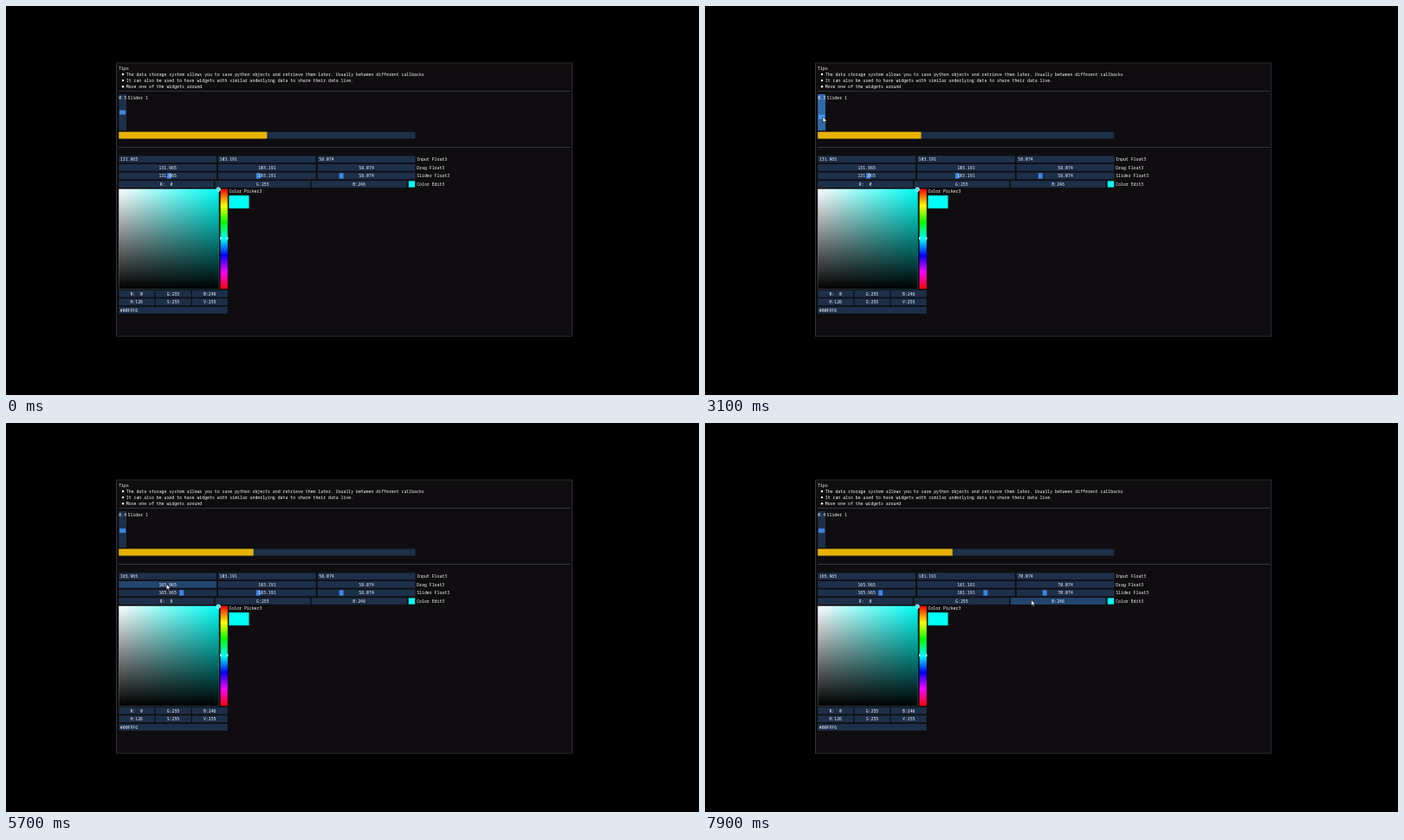
An HTML page with a canvas for the animation above (8 s loop, 800 px wide and 450 px high).

```html
<!DOCTYPE html>
<html lang="en">
<head>
<meta charset="utf-8">
<title>Shared widget values</title>
<style>
  html, body { margin: 0; width: 100%; height: 100%; overflow: hidden; background: #000; }
  canvas { display: block; }
</style>
</head>
<body>
<canvas width="800" height="450"></canvas>
<script>
const ctx = document.querySelector('canvas').getContext('2d');
const LOOP = 8000, STEP = 100;
const UI_SCALE = 0.4164;          // stage pixels per interface pixel
const ROW_H = 7.9;
const COLORS = {
  panel: '#0f0d0f', line: '#35353c', text: '#fff', frame: '#1d2f49', hover: '#23456d',
  active: '#3169ac', grab: '#3d85e0', grabActive: '#4296fa', bar: '#e8b200', pick: '#00fff6'
};

// Pointer path: time, x, y
const PATH = [
  [2300, 136, 124.2], [3100, 136, 128.3], [3600, 136, 124.6], [3700, 136, 124.6],
  [4050, 171, 177.3], [4350, 171, 177.3], [4550, 171, 186.3], [4600, 171, 186.3],
  [5000, 195.57, 186.3], [5200, 200.57, 186.3], [5650, 185.16, 186.3], [5700, 185.16, 186.3],
  [5950, 273, 186.3], [6250, 297.98, 186.3], [6400, 305.48, 186.3], [6550, 305.48, 186.3],
  [6950, 372, 186.3], [7250, 377, 186.3], [7400, 377, 186.3], [7700, 376.7, 204.6]
];
const SLIDE = [2300, 3600];
const DRAGS = [
  { base: 131.965, from: 4600, to: 5650 },
  { base: 103.191, from: 5950, to: 6500 },
  { base: 58.074, from: 6950, to: 7300 }
];
const SELECT = [4100, 4600];

const clamp = (v, lo, hi) => Math.min(hi, Math.max(lo, v));
const within = (t, [from, to]) => t >= from && t < to;

function pointer(t) {
  t = clamp(t, PATH[0][0], PATH.at(-1)[0]);
  const i = Math.max(1, PATH.findIndex(p => p[0] >= t));
  const [t0, x0, y0] = PATH[i - 1], [t1, x1, y1] = PATH[i];
  const k = (t - t0) / (t1 - t0);
  return { x: x0 + (x1 - x0) * k, y: y0 + (y1 - y0) * k };
}

function dragValue({ base, from, to }, t) {
  const moved = pointer(clamp(t, from, to)).x - pointer(from).x;
  return base + Math.round(moved / UI_SCALE);
}

function sliderValue(t) {
  return t < SLIDE[0] ? 0.5 : 0.5 - (pointer(clamp(t, ...SLIDE)).y - 123) / 35;
}

function rect(x, y, w, h, color) {
  ctx.fillStyle = color;
  ctx.fillRect(x, y, w, h);
}

function text(str, x, y, align = 'left') {
  ctx.save();
  ctx.translate(x, y + 1.7);
  ctx.scale(0.1, 0.1);
  ctx.font = '48.58px "Noto Sans Mono", "DejaVu Sans Mono", monospace';
  ctx.textAlign = align;
  ctx.fillStyle = COLORS.text;
  ctx.fillText(str, 0, 0);
  ctx.restore();
}

function cell(x, y, w, label, color = COLORS.frame) {
  rect(x, y, w, ROW_H, color);
  if (label) text(label, x + w / 2, y + 4.2, 'center');
}

function gradient(x, y, w, h, horizontal, stops) {
  const g = horizontal ? ctx.createLinearGradient(x, 0, x + w, 0) : ctx.createLinearGradient(0, y, 0, y + h);
  stops.forEach((c, i) => g.addColorStop(i / (stops.length - 1), c));
  rect(x, y, w, h, g);
}

function polygon(points, fill, stroke) {
  ctx.beginPath();
  points.forEach(([x, y]) => ctx.lineTo(x, y));
  ctx.closePath();
  ctx.fillStyle = fill;
  ctx.fill();
  if (stroke) {
    ctx.strokeStyle = stroke;
    ctx.lineWidth = 0.6;
    ctx.stroke();
  }
}

function drawTips() {
  text('Tips', 130.2, 71.8);
  [
    'The data storage system allows you to save python objects and retrieve them later. Usually between different callbacks',
    'It can also be used to have widgets with similar underlying data to share their data live.',
    'Move one of the widgets around'
  ].forEach((line, i) => {
    const y = 78.8 + i * 7.1;
    ctx.beginPath();
    ctx.arc(135, y + 0.2, 1.2, 0, 7);
    ctx.fillStyle = COLORS.text;
    ctx.fill();
    text(line, 138.8, y);
  });
  rect(130, 98, 522, 1, COLORS.line);
}

function drawSlider(t) {
  const value = sliderValue(t), active = within(t, SLIDE);
  rect(130.2, 102, 8.8, 42, active ? COLORS.active : COLORS.frame);
  rect(131, 120.5 + (0.5 - value) * 35, 7.2, 5, active ? COLORS.grabActive : COLORS.grab);
  text(value.toFixed(3).slice(0, 3), 130.3, 106);
  text('Slider 1', 140.6, 106);
  rect(130.2, 145.6, 342.3, 7.9, COLORS.frame);
  rect(130.2, 145.6, 342.3 * value, 7.9, COLORS.bar);
  rect(130, 163, 522, 1, COLORS.line);
}

function drawFloats(t, hovered) {
  DRAGS.forEach((drag, i) => {
    const x = 130.2 + i * 114.75, w = 112.8;
    const value = dragValue(drag, t), label = value.toFixed(3);
    const active = within(t, [drag.from, drag.to]);

    cell(x, 173.3, w);
    if (i === 0 && within(t, SELECT)) {
      rect(131.5, 174.3, 21.5, 6, '#2a5389');
      rect(153, 174.3, 0.5, 6, COLORS.text);
    }
    // The input field trails the dragged value by one refresh
    text(dragValue(drag, t - 16).toFixed(3), x + 1.6, 177.5);

    cell(x, 182.9, w, label, active ? COLORS.active : hovered(x, 182.9, w));
    cell(x, 192.5, w, '', hovered(x, 192.5, w));
    rect(x + 0.8 + value / 255 * 106.4, 193.3, 4.9, 6.4, COLORS.grab);
    text(label, x + w / 2, 196.7, 'center');
  });
  ['R:  0', 'G:255', 'B:246'].forEach((label, i) => {
    const x = 130.2 + i * 111.3;
    cell(x, 202.1, 109.7, label, hovered(x, 202.1, 109.7));
  });
  rect(464.7, 202.4, 7.4, 7.3, COLORS.pick);
  ['Input Float3', 'Drag Float3', 'Slider Float3', 'Color Edit3']
    .forEach((label, i) => text(label, 474.2, 177.5 + i * 9.6));
}

function drawPicker() {
  const x = 130.2, y = 211.7, size = 115.5, hueX = 247.6, hueW = 8.2;
  gradient(x, y, size, size, true, ['#fff', COLORS.pick]);
  gradient(x, y, size, size, false, ['#0000', '#000']);
  gradient(hueX, y, hueW, size, false, ['#f00', '#ff0', '#0f0', '#0ff', '#00f', '#f0f', '#f00']);

  const hueY = y + size * 126 / 255;
  for (const [edge, dir] of [[hueX - 0.6, 1], [hueX + hueW + 0.6, -1]]) {
    polygon([[edge, hueY - 1.7], [edge + 2 * dir, hueY], [edge, hueY + 1.7]], '#fff');
  }
  ctx.beginPath();
  ctx.arc(245.2, 212.2, 2.2, 0, 7);
  ctx.fillStyle = COLORS.pick;
  ctx.fill();
  ctx.strokeStyle = '#fff';
  ctx.lineWidth = 0.8;
  ctx.stroke();

  text('Color Picker3', 257.4, 214.7);
  rect(257.4, 219.2, 23.1, 15, COLORS.pick);
  [['R:  0', 'G:255', 'B:246'], ['H:126', 'S:255', 'V:255']].forEach((row, j) =>
    row.forEach((label, i) => cell(130.2 + i * 42.25, 328.8 + j * 9.6, 41, label)));
  cell(130.2, 348, 125.4);
  text('#00FFF6', 131.8, 352.2);
}

function drawPointer({ x, y }) {
  if (y > 173.3 && y < 181.2) {
    rect(x - 0.3, y - 3, 0.7, 6, '#fff');
    rect(x - 1.2, y - 3, 2.5, 0.6, '#fff');
    rect(x - 1.2, y + 2.4, 2.5, 0.6, '#fff');
    return;
  }
  const shape = [[0, 0], [0, 6.7], [1.5, 5.3], [2.5, 7.7], [3.6, 7.2], [2.6, 4.9], [4.7, 4.8]];
  polygon(shape.map(([dx, dy]) => [x + dx, y + dy]), '#fff', '#000');
}

function draw(t) {
  const mouse = pointer(t), shown = t > SLIDE[0];
  const busy = within(t, SLIDE) || DRAGS.some(d => within(t, [d.from, d.to]));
  const hovered = (x, y, w) =>
    shown && !busy && mouse.x >= x && mouse.x < x + w && mouse.y >= y && mouse.y < y + ROW_H
      ? COLORS.hover : COLORS.frame;

  rect(0, 0, 800, 450, '#000');
  rect(127, 65.5, 527, 317, COLORS.line);
  rect(128, 66.3, 525.2, 315.4, COLORS.panel);
  drawTips();
  drawSlider(t);
  drawFloats(t, hovered);
  drawPicker();
  if (shown) drawPointer(mouse);
}

function tick() {
  draw(Math.floor(performance.now() % LOOP / STEP) * STEP);
  requestAnimationFrame(tick);
}
tick();
</script>
</body>
</html>
```
